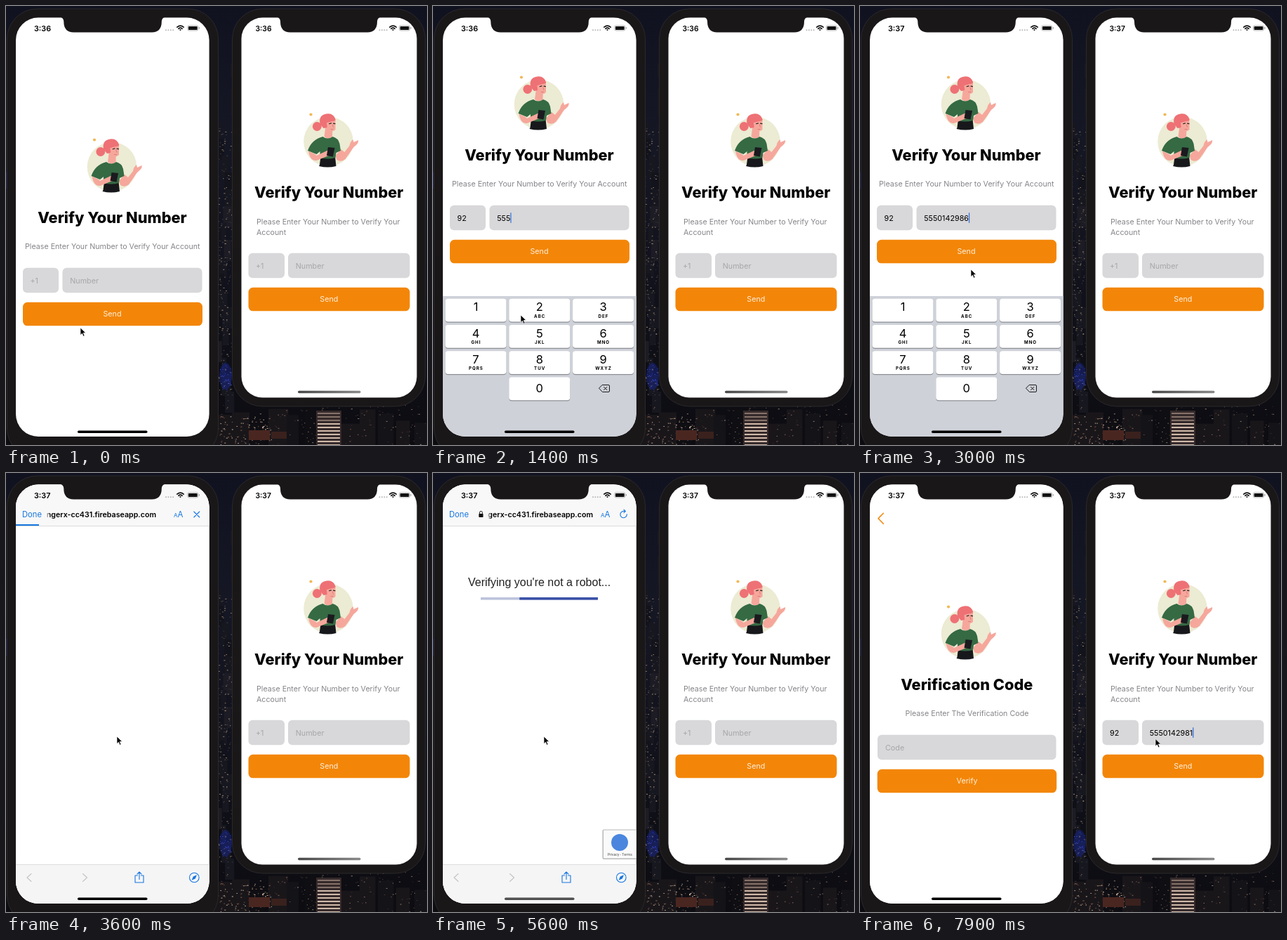
Animation of 600 by 625 pixels, one loop 8000 ms. Source, as an HTML page:

```html
<!DOCTYPE html>
<html lang="en">
<head>
<meta charset="utf-8">
<title>Number verification</title>
<style>
  html, body { margin: 0; width: 100%; height: 100%; overflow: hidden; background: #0f111b; }
  svg { display: block; width: 600px; height: 625px; }
  text { font-family: Inter, "Noto Sans", sans-serif; font-size: 10.75px; white-space: pre; }
  .mid { text-anchor: middle; }
  .title { font-size: 21.75px; font-weight: 800; text-anchor: middle; }
  .hint { fill: #85858a; font-size: 10.7px; }
  .ghost { fill: #a7a6aa; }
  .cta { fill: #fdeedb; text-anchor: middle; }
  .line { fill: none; stroke-linecap: round; stroke-linejoin: round; }
</style>
</head>
<body>
<svg id="stage" viewBox="0 0 600 625" xmlns="http://www.w3.org/2000/svg"></svg>
<script>
const LOOP = 8000, ORANGE = '#f38608', BLUE = '#1676e0', FIELD = '#d8d7d9';
const NUMBERS = { left: '5550142986', right: '5550142981' };

const rect = (x, y, w, h, fill, r = 0, extra = '') =>
  `<rect x="${x}" y="${y}" width="${w}" height="${h}" rx="${r}" fill="${fill}" ${extra}/>`;
const circle = (x, y, r, fill) => `<circle cx="${x}" cy="${y}" r="${r}" fill="${fill}"/>`;
const path = (d, fill) => `<path d="${d}" fill="${fill}"/>`;
const line = (d, stroke, w) => `<path class="line" d="${d}" stroke="${stroke}" stroke-width="${w}"/>`;
const text = (x, y, s, cls = '', extra = '') => `<text x="${x}" y="${y}" class="${cls}" ${extra}>${s}</text>`;
const group = (id, body) => `<g id="${id}">${body}</g>`;

function random(seed) {
  return () => (seed = (seed * 16807) % 2147483647) / 2147483647;
}

function city() {
  const rnd = random(77);
  const pick = list => list[Math.floor(rnd() * list.length)];
  const lights = (n, x, y, w, h, colors) => {
    let out = '';
    for (let i = 0; i < n; i++)
      out += rect((x + rnd() * w).toFixed(1), (y + rnd() * h).toFixed(1), 1 + rnd() * 1.3, 1, pick(colors));
    return out;
  };
  let out = rect(0, 0, 600, 625, 'url(#night)');
  for (let y = 165; y < 570; y += 24)
    out += rect(300 + rnd() * 12, y, 6 + rnd() * 12, 30, pick(['#17171f', '#1d1c24', '#12131b']));
  out += lights(200, 301, 172, 21, 390, ['#5b5148', '#8a7a69', '#39363c', '#a58b70', '#42414d']);
  out += '<ellipse cx="313" cy="527" rx="9" ry="19" fill="#1a2a9c" opacity=".45"/>' +
    lights(24, 305, 510, 16, 36, ['#2436b8', '#1a2788', '#3a4cc8']);
  out += rect(0, 236, 3, 24, '#1b2a78', 0, 'opacity=".6"');
  for (let x = 296; x < 600; x += 26)
    out += rect(x, 566 + rnd() * 30, 16 + rnd() * 14, 60, pick(['#141318', '#19161a', '#0e0e13']));
  out += lights(150, 300, 568, 298, 57, ['#4a352f', '#7a5e4e', '#2c262c', '#8d7b6c']) +
    lights(90, 304, 584, 74, 40, ['#8b6754', '#b19a86', '#5a3c33', '#cbb7a4']);
  out += rect(346, 604, 30, 14, '#4a2620') + rect(378, 606, 22, 10, '#3a211d');
  let floors = rect(442, 576, 36, 49, '#352a2b');
  for (let y = 579; y < 625; y += 5) floors += rect(444, y, 32, 2, y > 590 ? '#d0b9a9' : '#857269');
  return out + floors;
}

function woman() {
  const skin = '#f6a79c', hair = '#ee7175', green = '#356a43';
  return circle(151, 229, 35.3, '#ecebd3') + circle(126, 190.5, 2.1, '#f0b856') +
    circle(134.8, 207.5, 6.4, hair) +
    path('M161 249L169 240L174 244L181 235Q182 229 186 226L187 230L193.5 227Q195 231 187 237L175 254Q169 259 163 255Z', skin) +
    path('M138.5 262L140 250H160.5L162 264Q150 267 137.5 264Z', '#17181b') +
    path('M147 207H157L156.5 222Q151 227 145 222Z', skin) +
    path('M143 222Q150 227 157 222Q165 224 167 232L168.5 242L162 245L161 252Q150 255 139 252L139 243L134 247L121.5 242Q127 226 143 222Z', green) +
    path('M122.5 242.5L132 247L134 249L149 242Q153 240 156 243L154 248L134 256Q125 257 122.5 242.5Z', skin) +
    path('M150.5 237L160 238L157.5 250.5L148.5 249Z', '#1b1a1f') +
    path('M139 204Q137 192 146 190Q158 187 161 198L152 201Q152 210 144 210Z', hair) +
    path('M148 200H161V212Q157 216 150 213Z', skin) +
    path('M145 204Q149 201 161 199.5Q161 193 155 191L144 193Z', hair) +
    line('M152 203.7l3-.8M158 203.1l2.5.5', '#28211f', 1.1) +
    line('M157 205l.8 3.3M154.5 211.5h3', '#cf6d68', .7);
}

const field = (x, y, w) => rect(x, y, w, 35.5, FIELD, 6);
const button = (x, y, w) => rect(x, y, w, 33.5, ORANGE, 6.5);

function numberPage(side, p) {
  const base = p.top + 21.7;
  return `<g transform="translate(${p.artX} ${p.artY})">${woman()}</g>` +
    text(p.mid, p.title, 'Verify Your Number', 'title') +
    p.hint.map((s, i) => text(p.hintX, p.title + 37.8 + i * 14.8, s, 'hint')).join('') +
    field(p.codeX, p.top, p.codeW) + field(p.numX, p.top, p.numW) +
    text(p.codeX + 10.5, base, '', '', `id="${side}Code"`) +
    text(p.numX + 10.7, base, '', '', `id="${side}Num"`) +
    rect(0, p.top + 10.5, 1.2, 14.5, '#2b6fdc', 0, `id="${side}Caret"`) +
    button(p.codeX, p.top + 49, p.btnW) +
    text(p.mid, p.top + 69.6, 'Send', 'cta');
}

const codePage = () => rect(14, 16, 276, 598, '#fff') +
  line('M33.3 57.3L26 64.8L33.3 72.3', ORANGE, 1.6) +
  woman() + text(152.3, 308.5, 'Verification Code', 'title') +
  text(152.5, 346.3, 'Please Enter The Verification Code', 'hint mid') +
  field(25, 372.8, 254.5) + text(36, 394.5, 'Code', 'ghost') +
  button(24.7, 421.8, 255.5) + text(152.5, 442.4, 'Verify', 'cta');

function keyboard() {
  const letters = ['', 'ABC', 'DEF', 'GHI', 'JKL', 'MNO', 'PQRS', 'TUV', 'WXYZ'];
  const key = (col, row, digit, sub) => {
    const x = 17.5 + col * 90.8, y = 416.8 + row * 37.2, mid = x + 43.5;
    return rect(x, y + 1, 87, 33, '#8e9096', 4) + rect(x, y, 87, 32.8, '#fff', 4) +
      text(mid, y + (digit ? 17.5 : 22), digit, 'mid', 'style="font-size:16.5px"') +
      text(mid + .4, y + 27, sub, 'mid', 'style="font-size:6.2px;font-weight:700;letter-spacing:1px"');
  };
  return rect(14, 413, 276, 201, '#ced1d8') +
    letters.map((sub, i) => key(i % 3, Math.floor(i / 3), i + 1, sub)).join('') + key(1, 3, 0, '') +
    line('M241.5 539.5H250Q251.5 539.5 251.5 541V548Q251.5 549.5 250 549.5H241.5L236.8 544.5Z', '#1b1b1d', 1) +
    line('M243.5 542.3l4.4 4.4M247.9 542.3l-4.4 4.4', '#1b1b1d', 1);
}

function browser() {
  const bar = '#f8f8f8';
  return rect(14, 16, 276, 598, '#fff') + rect(14, 16, 276, 59.5, bar) +
    group('url', text(214, 62.5, 'ngerx-cc431.firebaseapp.com', '', 'text-anchor="end" style="font-weight:600;font-size:10.65px"')) +
    group('urlFade', rect(14, 50, 43, 18, bar) + rect(57, 50, 6, 18, 'url(#fade)')) +
    text(23, 62.7, 'Done', '', `fill="${BLUE}" style="font-size:11.2px"`) +
    group('lock', rect(65.3, 58, 6.2, 5, '#111', .8) + line('M66.5 58V56.3a1.9 1.9 0 0 1 3.8 0V58', '#111', 1)) +
    text(239, 62.8, 'A', '', `fill="${BLUE}" style="font-size:8px"`) +
    text(244.6, 62.8, 'A', '', `fill="${BLUE}" style="font-size:11.5px"`) +
    group('stop', line('M267.8 55l8 8M275.8 55l-8 8', BLUE, 1.1)) +
    group('reload', line('M276.3 58.8A4.7 4.7 0 1 1 271.5 54.4L274 54.4M272 52.2L274.4 54.4L272 56.6', BLUE, 1.1)) +
    rect(14, 75, 276, .7, '#cfcfd1') + rect(14, 73, 33, 2, BLUE, 0, 'id="load"') +
    group('check',
      text(50, 161, "Verifying you're not a robot...", '', 'fill="#212121" style="font-family:\'Liberation Sans\',Arial,sans-serif;font-size:16px"') +
      rect(68, 177, 167, 3.6, '#bcc3dc') + rect(68, 177, 0, 3.6, '#3b51a8', 0, 'id="robotBar"')) +
    group('badge', rect(241.5, 507.5, 52, 42.5, '#b9b9bb', 2) + rect(243, 508.5, 50, 40, '#fafafa', 1) +
      circle(266, 526, 12, '#4a86de') +
      text(266.3, 545.3, 'Privacy - Terms', 'mid', 'fill="#555" style="font-family:Roboto,sans-serif;font-size:5.2px"')) +
    rect(14, 557, 276, 57, '#f5f5f6') + rect(14, 557, 276, .7, '#d4d4d6') +
    line('M36 570.5L30 576L36 581.5M109.5 570.5L115.5 576L109.5 581.5', '#c3c3c6', 1.1) +
    line('M187.5 573H184V583H196V573H192.5M190 578.5V568.2M187 571L190 568L193 571', BLUE, 1.1) +
    `<circle class="line" cx="268.3" cy="576" r="6.8" stroke="${BLUE}" stroke-width="1.1"/>` +
    path('M272 572.3L269.8 577.5L264.6 579.7L266.8 574.5Z', BLUE);
}

function statusBar(side, x, size, dots, wifi, batt) {
  const c = '#111';
  return text(x, 35.7, '', '', `id="${side}Clock" style="font-weight:600;font-size:${size}px"`) +
    [0, 1, 2, 3].map(i => circle(dots + i * 3.4, 34.2, 1, '#b6b6b8')).join('') +
    line(`M${wifi - 4.7} 30.2q4.7-4.2 9.4 0M${wifi - 2.7} 32.3q2.7-2.4 5.4 0`, c, 1.6) +
    circle(wifi, 34, 1.1, c) +
    rect(batt, 27.8, 15, 7.2, 'none', 2, 'stroke="#9a9a9c" stroke-width=".7"') +
    rect(batt + 1.1, 28.9, 12.8, 5, c, 1) + rect(batt + 16, 30, 1, 2.8, '#9a9a9c', .5);
}

const bezel = (x, y, w, h) => rect(x, y, w, h, '#1a1718', 43, 'stroke="#2b282b" stroke-width="1"');
const notch = (a, b) =>
  path(`M${a - 6} 15Q${a} 17 ${a} 22Q${a} 37.4 ${a + 14} 37.4H${b - 14}Q${b} 37.4 ${b} 22Q${b} 17 ${b + 6} 15Z`, '#1a1718');

const left = { mid: 151.5, artX: 0, artY: 0, title: 308.5, hintX: 27, top: 372.8, codeX: 24, codeW: 51,
  numX: 80.5, numW: 199, btnW: 256, hint: ['Please Enter Your Number to Verify Your Account'] };
const right = { mid: 460.3, artX: 308.5, artY: -36, title: 273.3, hintX: 357, top: 351.8, codeX: 345.5, codeW: 51.5,
  numX: 402, numW: 173.5, btnW: 230, hint: ['Please Enter Your Number to Verify Your', 'Account'] };

document.getElementById('stage').innerHTML = `<defs>
  <linearGradient id="night" x2="0" y2="1"><stop stop-color="#101220"/><stop offset=".3" stop-color="#151724"/><stop offset="1" stop-color="#0c0c11"/></linearGradient>
  <linearGradient id="fade"><stop stop-color="#f8f8f8"/><stop offset="1" stop-color="#f8f8f8" stop-opacity="0"/></linearGradient>
  <linearGradient id="pill"><stop stop-color="#484848"/><stop offset="1" stop-color="#8a8a8a"/></linearGradient>
  <clipPath id="screen">${rect(14, 16.6, 275.6, 596.4, '#000', 32)}</clipPath></defs>` +
  city() +
  bezel(1.5, 4, 301, 640) + rect(320, 82, 2.5, 20, '#191822') + rect(320, 118, 2.5, 38, '#191822') +
  bezel(322.5, 4, 275, 566) +
  '<g clip-path="url(#screen)">' + rect(14, 16, 276, 598, '#fff') +
    group('leftPage', numberPage('left', left)) + rect(14, 16, 276, 598, '#000', 0, 'id="dim"') +
    group('keys', keyboard()) + group('codePage', codePage()) + group('sheet', browser()) +
    statusBar('left', 40, 10.8, 228, 248.5, 258.8) +
    rect(102, 604.6, 99.5, 3.4, '#000', 1.7, 'id="home"') + '</g>' +
  rect(335.5, 16.6, 250, 541, '#fff', 30) + numberPage('right', right) +
  statusBar('right', 355.5, 10.3, 532.5, 551.5, 560.5) +
  rect(416, 547.8, 89.5, 3.4, 'url(#pill)', 1.7) +
  notch(82.3, 221.8) + notch(391, 529) +
  group('cursor', '<path d="M0 0V10.5L2.5 8.2L4.2 12.3L6 11.5L4.3 7.5H7.7Z" fill="#000" stroke="#fff" stroke-width=".7"/>');

const $ = id => document.getElementById(id);
const ramp = (t, a, b) => Math.min(1, Math.max(0, (t - a) / (b - a)));
const smooth = x => x * x * (3 - 2 * x);
const easeOut = x => 1 - (1 - x) ** 3;
const move = (id, x, y) => $(id).setAttribute('transform', `translate(${x} ${y})`);
const show = (id, on) => $(id).setAttribute('visibility', on ? 'inherit' : 'hidden');
const typed = (s, t, start, step) => s.slice(0, Math.max(0, Math.floor((t - start) / step) + 1));

const trail = [[0, 106, 458], [300, 52, 394], [800, 52, 394], [1000, 122, 304], [1100, 122, 304], [1400, 125, 440],
  [2100, 128, 436], [2500, 156, 350], [2700, 156, 350], [2900, 158, 375], [5900, 158, 375], [6300, 421, 378.5],
  [6400, 421, 378.5], [6600, 372, 374], [6900, 372, 374], [7100, 421, 378.5], [LOOP, 421, 378.5]];

function cursorAt(t) {
  const i = Math.max(1, trail.findIndex(p => p[0] > t));
  const [a, b] = [trail[i - 1], trail[i]];
  const k = smooth(ramp(t, a[0], b[0]));
  return [a[1] + (b[1] - a[1]) * k, a[2] + (b[2] - a[2]) * k];
}

function fill(id, value, placeholder) {
  const el = $(id);
  el.textContent = value || placeholder;
  el.setAttribute('class', value ? '' : 'ghost');
  return +el.getAttribute('x') + (value ? el.getComputedTextLength() : 0);
}

function form(side, code, number, focus) {
  const ends = { code: fill(side + 'Code', code, '+1'), num: fill(side + 'Num', number, 'Number') };
  show(side + 'Caret', !!focus);
  if (focus) $(side + 'Caret').setAttribute('x', ends[focus]);
}

function draw(t) {
  $('leftClock').textContent = $('rightClock').textContent = t < 2400 ? '3:36' : '3:37';

  form('left', typed('92', t, 800, 100), typed(NUMBERS.left, t, 1130, 120),
    t < 400 || t >= 3200 ? '' : t < 1000 ? 'code' : 'num');
  form('right', typed('92', t, 6800, 100), typed(NUMBERS.right, t, 7100, 80),
    t < 6600 ? '' : t < 7050 ? 'code' : 'num');

  const up = easeOut(ramp(t, 400, 700)) * (1 - easeOut(ramp(t, 3100, 3500)));
  const push = smooth(ramp(t, 6200, 6700));
  move('leftPage', -82 * push, -89 * up);
  move('keys', 0, 202 * (1 - up));
  move('codePage', 278 * (1 - push), 0);
  $('dim').setAttribute('opacity', push * .12);

  const sheet = easeOut(ramp(t, 3100, 3500)) * (1 - easeOut(ramp(t, 5800, 6100)));
  const loaded = t >= 4500;
  move('sheet', 0, 600 * (1 - sheet));
  move('url', loaded ? 14 : 0, 0);
  move('urlFade', loaded ? 20 : 0, 0);
  for (const id of ['lock', 'reload', 'check']) show(id, loaded);
  show('stop', !loaded);
  show('badge', t >= 4900);
  show('load', !loaded);
  $('load').setAttribute('width', 33 + 243 * easeOut(ramp(t, 3600, 4500)));
  $('home').setAttribute('fill', loaded && t < 5900 ? '#505050' : '#000');

  // Indeterminate bar: grows to the right edge, then shrinks into it.
  const phase = ((t - 5600) / 1000 + 10.527) % 1;
  const from = phase < .5 ? phase * .5 : Math.min(1, .25 + (phase - .5) * 3);
  const to = phase < .5 ? phase * 2 : 1;
  $('robotBar').setAttribute('x', 68 + 167 * from);
  $('robotBar').setAttribute('width', 167 * (to - from));

  move('cursor', ...cursorAt(t));
}

function tick(now) {
  draw(Math.floor((now % LOOP) / 100) * 100);
  requestAnimationFrame(tick);
}
draw(0);
requestAnimationFrame(tick);
</script>
</body>
</html>
```
